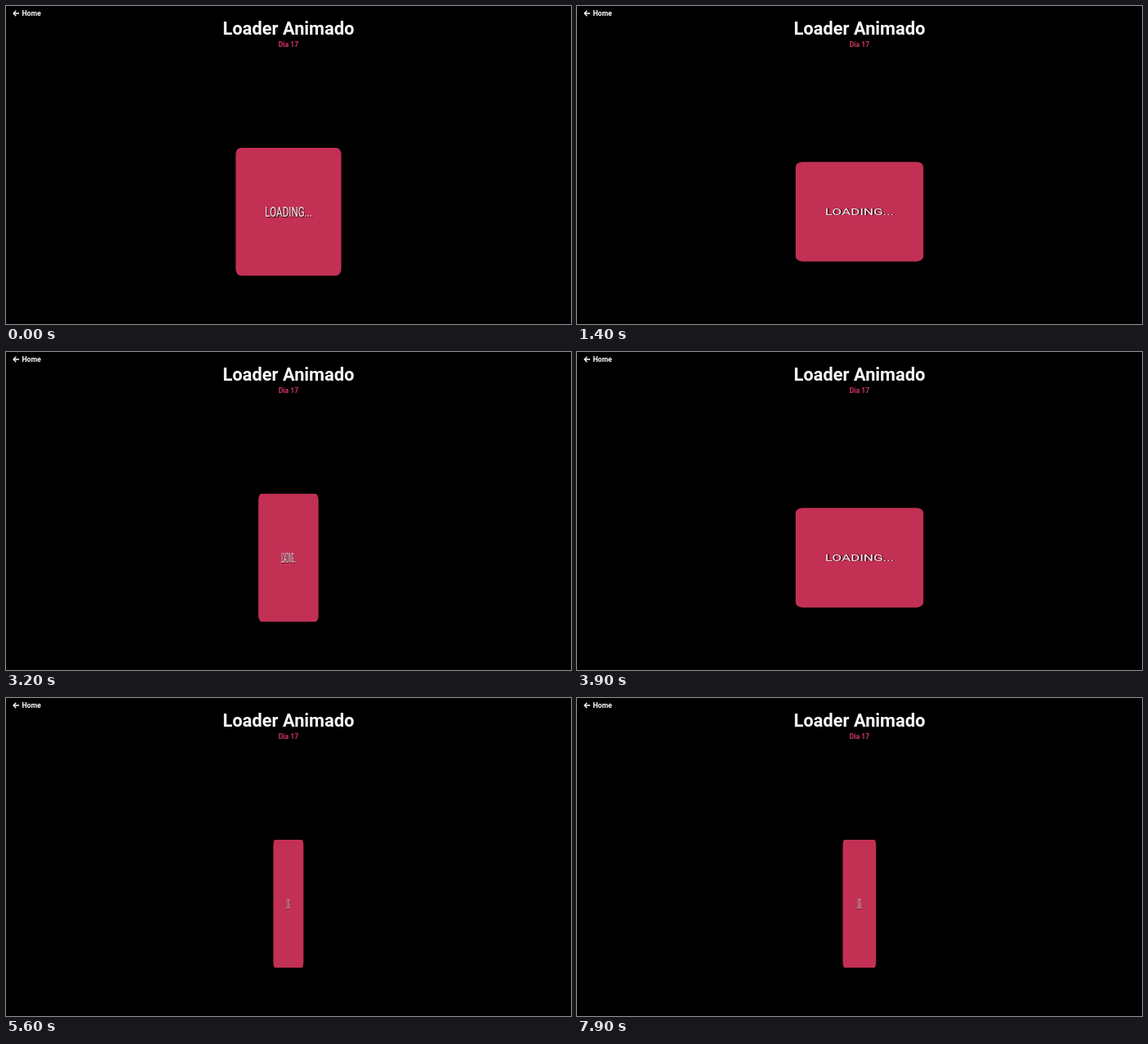
Write an HTML page that moves like this. It is 690 px wide and 388 px high and loops after 8 s.

```html
<!DOCTYPE html>
<html lang="pt">
<head>
<meta charset="utf-8">
<title>Loader Animado</title>
<style>
  html, body { margin: 0; width: 100%; height: 100%; overflow: hidden; background: #000; }
  body { position: relative; font-family: Roboto, "Liberation Sans", sans-serif; }
  svg { position: absolute; left: 0; top: 0; }
  .title { font-size: 21.8px; font-weight: 700; fill: #f8f8f8; text-anchor: middle; }
  .day { font-size: 8.6px; font-weight: 700; fill: #cc3660; text-anchor: middle; }
  .home { font-size: 8.7px; font-weight: 700; fill: #fff; }
  #card {
    position: absolute; left: 267.1px; top: 172.6px; width: 155.7px; height: 155.7px;
    display: flex; align-items: center; justify-content: center;
    border-radius: 8px; background: #c23054;
  }
  #label { font-size: 17px; color: #f2f2f2; text-shadow: 1.4px 1.4px 1px rgba(0, 0, 0, .8); }
</style>
</head>
<body>
<svg width="690" height="388">
  <path d="M16 9H9.3M12.3 5.8L9.1 9L12.3 12.2" fill="none" stroke="#fff" stroke-width="1.3"/>
  <text class="home" x="19.4" y="12.2">Home</text>
  <text class="title" x="345" y="35.2">Loader Animado</text>
  <text class="day" x="345" y="50.2">Dia 17</text>
</svg>
<div id="card"><span id="label">LOADING...</span></div>
<script>
  const LOOP = 8000, TURN = 1250, LEAD = 119;
  const card = document.getElementById('card');
  const label = document.getElementById('label');
  const start = performance.now();

  // Linear half turns, alternately about the vertical and horizontal axis.
  // The label turns inside the card, so its squash is squared.
  function draw(now) {
    const t = Math.max((now - start) % LOOP, LEAD) + LEAD;
    const axis = Math.floor(t / TURN) % 2 ? 'Y' : 'X';
    const squash = Math.abs(Math.cos(Math.PI * (t % TURN) / TURN));
    card.style.transform = label.style.transform = `scale${axis}(${squash.toFixed(4)})`;
    requestAnimationFrame(draw);
  }
  draw(start);
</script>
</body>
</html>
```
